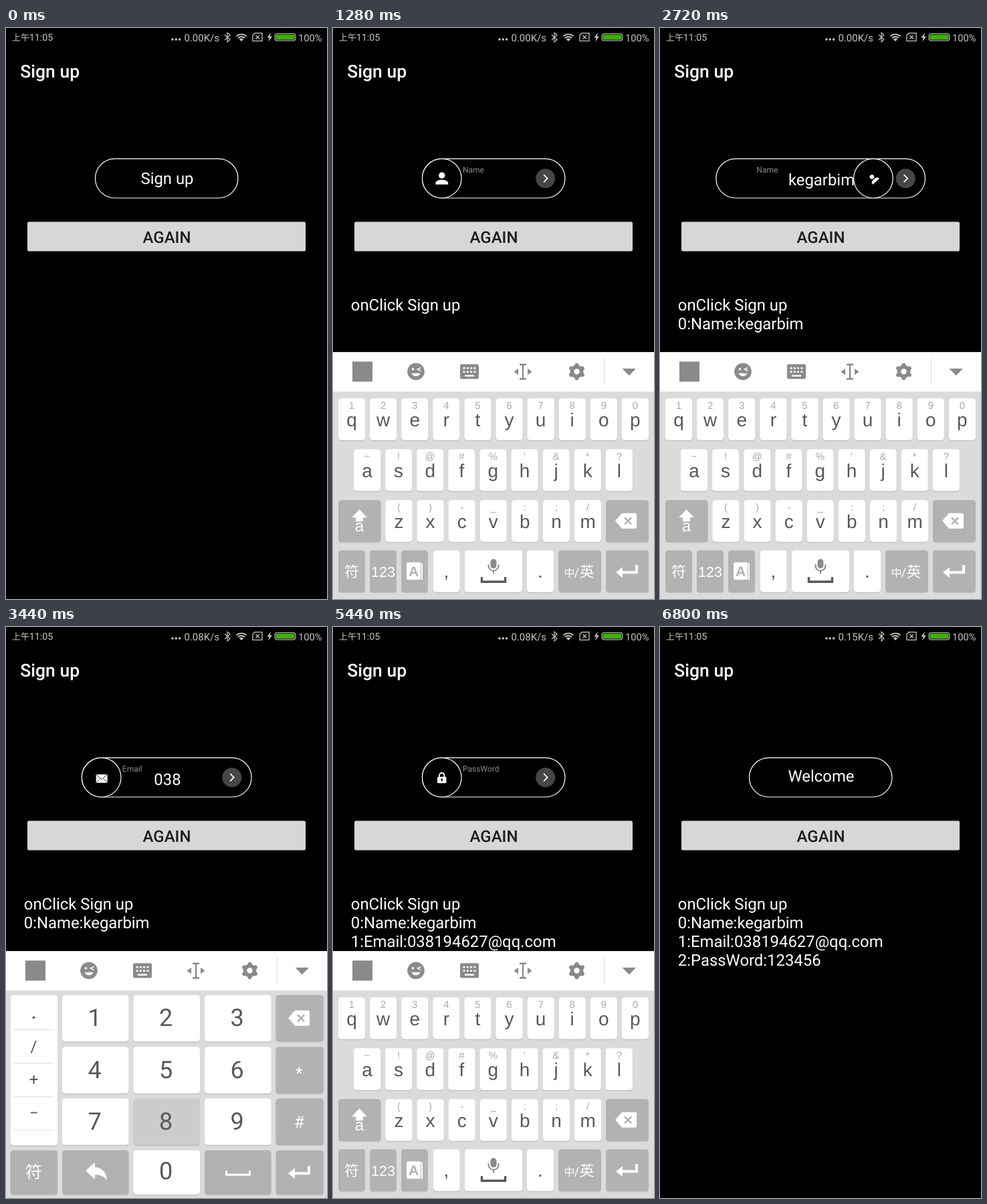
Recreate the animation shown at these times as an HTML page with a canvas. Size 480x853 px, loop 6.88 s.

```html
<!DOCTYPE html>
<html lang="en">
<head>
<meta charset="utf-8">
<title>Sign up</title>
<style>
  html, body { margin: 0; width: 100%; height: 100%; overflow: hidden; background: #000; }
  canvas { display: block; }
</style>
</head>
<body>
<canvas id="stage" width="480" height="853"></canvas>
<script>
const ctx = document.getElementById('stage').getContext('2d');
const LOOP = 6880, STEP = 80, CX = 240.2, CY = 224.7, R = 29.3, ROLL = 400, SIZE = 23.88;
const ROBOTO = 'Roboto, "Noto Sans CJK SC", "Noto Sans CJK", sans-serif';
const KEYS = '"Liberation Sans", "Noto Sans CJK SC", "Noto Sans CJK", sans-serif';
const GREY = '#8a8a8a', INK = '#585858', DARK = '#b2b2b2';
ctx.textRendering = 'geometricPrecision';

// Form steps: enter = circle rolls in, roll = circle rolls to the right end
const fields = [
  { label: 'Name', value: 'kegarbim', enter: 480, type: 1480, step: 110, roll: 2396, base: 235, icon: person },
  { label: 'Email', value: '038194627@qq.com', enter: 2800, type: 3240, step: 80, roll: 4480, base: 236, icon: envelope },
  { label: 'PassWord', value: '123456', enter: 4960, type: 5520, step: 80, roll: 5945, base: 241, icon: lock }
];

const clamp = v => Math.max(0, Math.min(1, v));
const ramp = (t, start, length) => clamp((t - start) / length);
const mix = (a, b, p) => a + (b - a) * p;

function text(s, x, y, size, color = '#fff', align = 'left', font = ROBOTO, weight = 400) {
  ctx.font = `${weight} ${size}px ${font}`;
  ctx.textAlign = align;
  ctx.fillStyle = color;
  ctx.fillText(s, x, y);
}
function box(x, y, w, h, r, color) {
  ctx.beginPath();
  ctx.roundRect(x, y, w, h, r);
  ctx.fillStyle = color;
  ctx.fill();
}
function disc(x, y, r, color) {
  ctx.beginPath();
  ctx.arc(x, y, r, 0, 7);
  ctx.fillStyle = color;
  ctx.fill();
}
function fill(d, color = '#fff') {
  ctx.fillStyle = color;
  ctx.fill(new Path2D(d));
}
function line(d, color = '#fff', width = 1.3) {
  ctx.strokeStyle = color;
  ctx.lineWidth = width;
  ctx.stroke(new Path2D(d));
}
function at(x, y, draw) {
  ctx.save();
  ctx.translate(x, y);
  draw();
  ctx.restore();
}

// Field icons, centred on the circle
function person() {
  disc(0, -4.5, 4.7, '#fff');
  fill('M-9.3 9V6.5C-9 3.5-4.5 2 0 2S9 3.5 9.3 6.5V9Z');
}
function envelope() {
  box(-8, -4.5, 17, 12.5, 1, '#fff');
  line('M-7.5 -4L0.5 3L8.5 -4M-7.5 7.5L-2 2M8.5 7.5L3 2', '#333', 1);
}
function lock() {
  box(-6.7, -1, 13.4, 9.6, 1, '#fff');
  line('M-3.7 0V-3A3.7 3.7 0 0 1 3.7 -3V0', '#fff', 1.8);
  disc(0, 3, 1.5, '#111');
  line('M0 3V6.3', '#111', 1.2);
}

function statusBar(t) {
  const c = '#c4c4c4';
  text('上午', 8.7, 19, 13.2, c);
  text('11:05', 70.3, 19.3, 14.3, c, 'right');
  const speed = t < 2880 ? '0.00' : t < 5760 ? '0.08' : '0.15';
  text(speed + 'K/s', 319, 19.5, 15, c, 'right');
  for (const x of [249, 254.3, 259.6]) disc(x, 17, 1.8, c);
  line('M327 10L335 17.5L331 21V7L335 10.5L327 18', c, 1.2);
  line('M344.5 12.3A11 11 0 0 1 359.5 12.3M347 15A7.3 7.3 0 0 1 357 15', c, 1.8);
  fill('M352 20L348.8 16.8A4.6 4.6 0 0 1 355.2 16.8Z', c);
  line('M372 7.7H383V19.3H369V10.7ZM373.5 11L379 16.5M379 11L373.5 16.5', c, 1.3);
  fill('M396 7L390.5 14.5H393.7L392 20.5L398 12.5H394.7Z', c);
  box(401.5, 8, 32, 11.5, 4, c);
  box(402.6, 9.1, 29.8, 9.3, 3, '#111');
  box(403.4, 9.9, 28.2, 7.7, 2.2, '#3fae08');
  text('100%', 437, 19.5, 14.7, c);
}

function typed(f, t) {
  let n = Math.floor((t - f.type) / f.step) + 1;
  if (f.label === 'Email' && n > 10) n = 10 + Math.max(0, Math.floor((t - 4320) / 27) + 1);
  return f.value.slice(0, Math.max(0, n));
}
function pillWidth(s) {
  ctx.font = `${SIZE}px ${ROBOTO}`;
  return Math.min(427, 213.5 + ctx.measureText(s).width);
}
function pill(width) {
  ctx.beginPath();
  ctx.roundRect(CX - width / 2, CY - R, width, 2 * R, R);
  ctx.strokeStyle = '#fff';
  ctx.lineWidth = 1.2;
  ctx.stroke();
}

function form(t) {
  const i = fields.findLastIndex(f => t > f.enter);
  const last = fields[fields.length - 1];
  if (i < 0) {
    pill(213.5);
    ctx.globalAlpha = 1 - ramp(t, 0, 480);
    text('Sign up', 241, 233, SIZE, '#fff', 'center');
    ctx.globalAlpha = 1;
    return;
  }
  if (t > 6400) {
    pill(mix(pillWidth(last.value), 213.5, ramp(t, 6400, 320)));
    ctx.globalAlpha = ramp(t, 6400, 400);
    text('Welcome', 241, 231, SIZE, '#fff', 'center');
    ctx.globalAlpha = 1;
    return;
  }
  const f = fields[i], s = typed(f, t);
  const enter = ramp(t, f.enter, ROLL), roll = ramp(t, f.roll, ROLL);
  const before = i ? pillWidth(fields[i - 1].value) : 213.5;
  const width = enter < 1 ? mix(before, 213.5, enter) : pillWidth(s);
  const left = CX - width / 2, right = left + width;

  pill(width);
  ctx.globalAlpha = enter;
  text(f.label, left + 60.5, 215.5, 12, '#8c8c8c');
  disc(right - 29.3, CY, 14.5, '#464646');
  at(right - 29.3, CY, () => line('M-2.6 -5.6L3 0L-2.6 5.6', '#fff', 1.7));
  ctx.globalAlpha = 1;
  if (f === last) {
    for (let k = 0; k < s.length; k++)
      text('*', 257 - 11 * s.length + 22 * k, f.base, SIZE, '#fff', 'center');
  } else {
    text(s, 241.5, f.base, SIZE, '#fff', 'center');
  }

  const p = enter < 1 ? 1 - enter : roll;
  const x = mix(left + R, right - R, p);
  disc(x, CY, R, '#000');
  ctx.strokeStyle = '#fff';
  ctx.lineWidth = 1.2;
  ctx.stroke();
  at(x, CY, () => {
    ctx.rotate(-0.9 * p);
    ctx.scale(1 - 0.38 * p, 1 - 0.38 * p);
    f.icon();
  });
}

function log(t) {
  const lines = t < 400 ? [] : ['onClick Sign up'];
  fields.forEach((f, i) => { if (t > f.roll) lines.push(`${i}:${f.label}:${f.value}`); });
  lines.forEach((s, i) => text(s, 26.8, 422 + 28 * i, SIZE));
}

// Keyboard parts use y measured from the top of the toolbar
function toolbar(suggest) {
  box(0, 0, 480, 59, 0, '#fff');
  box(405, 9, 1, 40, 0, '#ddd');
  if (suggest) {
    ctx.save();
    ctx.beginPath();
    ctx.rect(0, 0, 405, 59);
    ctx.clip();
    ['qq.com', '163.com', '126.com'].forEach((s, k) => text(s, [21, 158.5, 303][k], 41, 30.2, INK));
    ctx.restore();
    disc(442.5, 29, 12.3, GREY);
    line('M438 24.5L447 33.5M447 24.5L438 33.5', '#fff', 2.4);
    return;
  }
  box(29, 14, 30, 30, 0, GREY);
  disc(124, 29, 12.8, GREY);
  disc(119.5, 25.5, 1.8, '#fff');
  line('M131.5 23L126.5 25.5L131.5 28', '#fff', 1.5);
  fill('M117.5 31.5H130.5A6.8 6.3 0 0 1 117.5 31.5Z');
  box(190, 18, 28, 22, 2.5, GREY);
  for (let k = 0; k < 8; k++) box(194.5 + k % 4 * 5.3, k < 4 ? 22.5 : 28, 3, 2.6, 0, '#fff');
  box(197, 34, 14, 2.4, 0, '#fff');
  line('M279 18.5H289M284 18.5V40M279 40H289', GREY, 2.4);
  fill('M277 24.5V34L270.5 29.2ZM291 24.5V34L297.5 29.2Z', GREY);
  gear(364.5, 29);
  fill('M432.5 24.5H453L442.8 35Z', GREY);
}
function gear(x, y) {
  let d = '';
  for (let k = 0; k < 24; k++) {
    const a = (k + 0.5) * Math.PI / 12, r = k % 4 === 1 || k % 4 === 0 ? 12.7 : 9.8;
    const turn = a - Math.PI / 4 + Math.PI / 12 + Math.PI / 12;
    d += `${k ? 'L' : 'M'}${x + r * Math.sin(turn)} ${y - r * Math.cos(turn)}`;
  }
  fill(d + 'Z', GREY);
  disc(x, y, 4.2, '#fff');
}
function key(x, y, w, h, color = '#fff') {
  box(x, y + 1.5, w, h, 4.5, '#c1c1c1');
  box(x, y, w, h, 4.5, color);
}
const tint = (c, down) => c === down ? '#ccc' : '#fff';

function enterIcon(x, y) {
  fill('M14 -10H17V3H-6V9L-16 1L-6 -7V-1H13V-10Z');
}
function deleteIcon() {
  fill('M-17 0L-7 -11.5H13Q15 -11.5 15 -9.5V9.5Q15 11.5 13 11.5H-7Z');
  line('M-3 -5L7 5M7 -5L-3 5', DARK, 2.6);
}

function letters(down) {
  const rows = [
    ['qwertyuiop', '1234567890', 8, 69],
    ['asdfghjkl', "~!@#%'&*?", 31, 145],
    ['zxcvbnm', '()-_:;/', 78.5, 221]
  ];
  for (const [chars, hints, x0, y] of rows) {
    [...chars].forEach((c, k) => {
      const x = x0 + 47.1 * k, pressed = down === hints[k] ? hints[k] : c;
      key(x, y, 40, 62.5, tint(pressed, down));
      text(hints[k], x + 20, y + 15.5, 15, '#a8a8a8', 'center', KEYS);
      text(c, x + 20, y + 42, 28, INK, 'center', KEYS);
    });
  }
  key(8, 221, 63.5, 62.5, DARK);
  fill('M39.5 235L51 247H45V253H34V247H28Z');
  text('a', 39.5, 268, 24, '#fff', 'center', KEYS);
  key(408, 221, 64, 62.5, DARK);
  at(439, 252, deleteIcon);

  for (const [x, w, c] of [[8, 40, DARK], [55, 40, DARK], [102, 40, DARK], [150, 39.5],
    [197, 86], [290, 40], [337, 64, DARK], [408, 64, DARK]]) key(x, 296, w, 62.5, c);
  text('符', 28, 336, 22, '#fff', 'center');
  text('123', 75, 335.5, 21.5, '#fff', 'center', KEYS);
  box(114, 315, 20, 26, 2, '#fff');
  box(110, 316, 22, 26, 2, DARK);
  box(110, 314, 21, 26, 2, '#fff');
  text('A', 120.5, 335, 21, DARK, 'center', KEYS, 700);
  text(',', 169.5, 337, 28, INK, 'center', KEYS);
  text('.', 310, 337, 28, INK, 'center', KEYS);
  box(235.5, 309, 9, 14, 4.5, GREY);
  line('M232.5 317V319A7.5 7.5 0 0 0 247.5 319V317M240 326.5V331', GREY, 2);
  line('M222.5 336V343H257.5V336', INK, 3.4);
  text('中', 353.5, 336, 16, '#fff', 'center');
  text('/', 364.5, 336, 19, '#fff', 'center');
  text('英', 379.5, 336, 22, '#fff', 'center');
  at(439, 328, enterIcon);
}

function digits(down) {
  const cols = [84, 190.5, 297], rows = [65.5, 143, 220, 297.5];
  key(6.5, 65.5, 70.5, 224.5);
  disc(41.5, 99, 1.9, INK);
  ['/', '+', '−'].forEach((c, k) => text(c, 41.5, 150.6 + 49.3 * k, 24, INK, 'center'));
  for (let k = 0; k < 4; k++) box(11, 117 + 50 * k, 61, 1, 0, '#ddd');
  for (let n = 1; n < 10; n++) {
    const x = cols[(n - 1) % 3], y = rows[Math.floor((n - 1) / 3)];
    key(x, y, 99.5, 69.5, tint(String(n), down));
    text(n, x + 48.5, y + 46.5, 36, INK, 'center');
  }
  rows.forEach((y, k) => key(403.5, y, 71.5, k < 3 ? 69.5 : 66, DARK));
  at(439, 100, deleteIcon);
  text('*', 438.5, 191, 25, '#fff', 'center');
  text('#', 438.5, 264, 25, '#fff', 'center');
  at(438, 331, enterIcon);
  key(6.5, 297.5, 70.5, 66, DARK);
  text('符', 41.5, 338.5, 25, '#fff', 'center');
  key(84, 297.5, 99.5, 66, DARK);
  fill('M119 328L133 315.5V323C144 323 150 331 151 342C146 336 141 334 133 334V341Z');
  key(190.5, 297.5, 99.5, 66, tint('0', down));
  text('0', 239, 340.5, 36, INK, 'center');
  key(297, 297.5, 99.5, 66, DARK);
  line('M329.5 328V334H364.5V328', '#fff', 3);
}

function keyboard(t) {
  const rise = 1 - ramp(t, 960, 320), drop = ramp(t, 6000, 247);
  if (t < 1000 || drop === 1) return;
  const numeric = t >= 3120 && t < 3920 || t >= 5520;
  const active = fields.find(f => t >= f.type && t < f.type + f.step * Math.min(10, f.value.length));
  const down = active && typed(active, t).at(-1);
  at(0, 484.3 + 369 * (rise ** 2 + drop ** 3), () => {
    box(0, 0, 480, 400, 0, '#dbdbdb');
    toolbar(t >= 4160 && t < 4400);
    (numeric ? digits : letters)(down);
  });
}

function draw(now) {
  const t = Math.floor(now % LOOP / STEP) * STEP;
  box(0, 0, 480, 853, 0, '#000');
  statusBar(t);
  text('Sign up', 21.3, 74, 26.5, '#fff', 'left', ROBOTO, 500);
  form(t);
  box(32, 289.5, 416, 44, 2.5, '#d7d7d7');
  text('AGAIN', 240.5, 321, 24, '#1b1b1b', 'center', ROBOTO, 500);
  log(t);
  keyboard(t);
}

let start;
function tick(now) {
  start ??= now;
  draw(now - start);
  requestAnimationFrame(tick);
}
requestAnimationFrame(tick);
</script>
</body>
</html>
```
